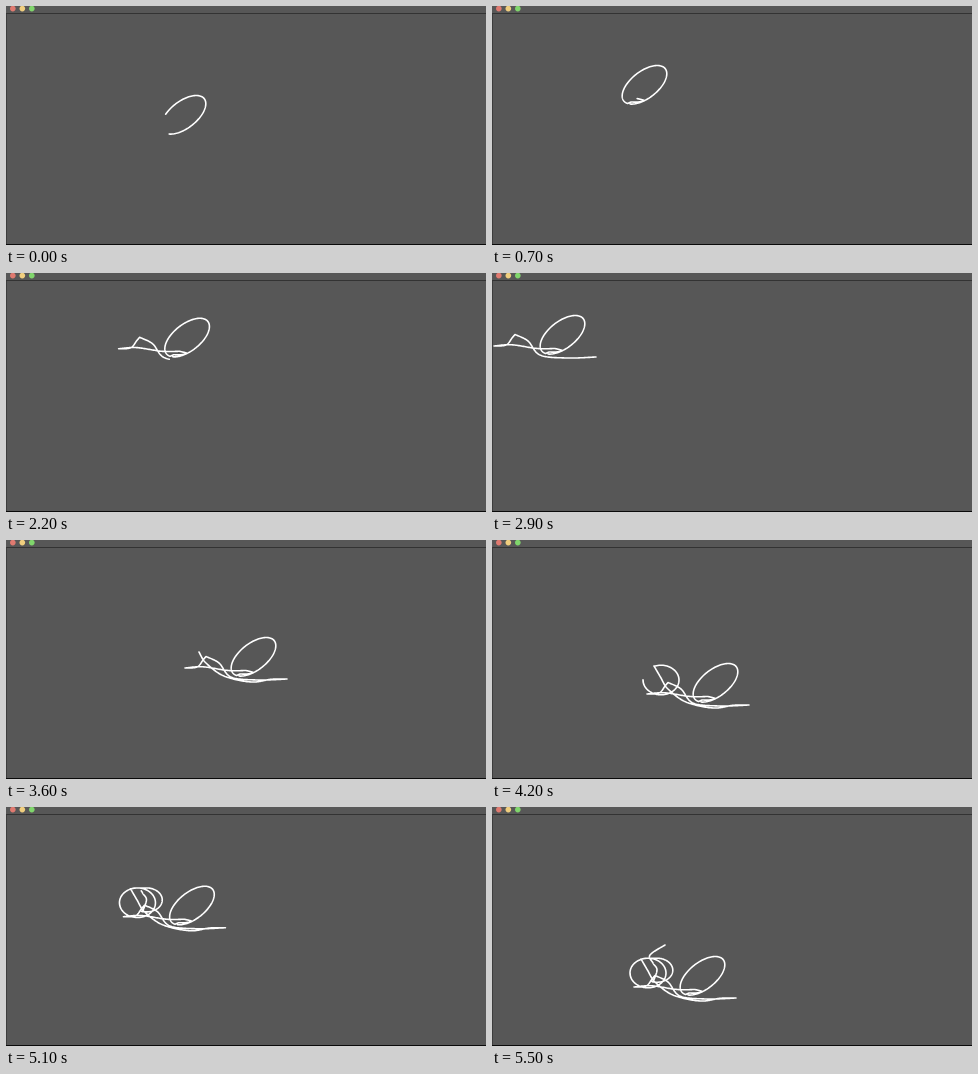
These frames come from a looping animation (480x239 px, 5.6 s). An HTML page with a canvas:

```html
<!DOCTYPE html>
<html>
<head>
<meta charset="utf-8">
<style>
html, body { margin: 0; width: 100%; height: 100%; overflow: hidden; background: #575757; }
canvas { display: block; width: 480px; height: 239px; }
</style>
</head>
<body>
<canvas id="stage" width="480" height="239"></canvas>
<script>
const ctx = document.getElementById('stage').getContext('2d');
const LOOP = 5600, STEP = 100;
const HOLDS = [600, 2400]; // steps that repeat the picture before them

// Catmull-Rom curve through the points; u runs from 0 to points.length - 1.
function spline(points, u) {
  const last = points.length - 1;
  const i = Math.min(Math.floor(u), last - 1), k = u - i;
  const at = n => points[Math.max(0, Math.min(last, n))];
  const [a, b, c, d] = [at(i - 1), at(i), at(i + 1), at(i + 2)];
  return b.map((v, n) => v + k / 2 * (c[n] - a[n]
    + k * (2 * a[n] - 5 * v + 4 * c[n] - d[n] + k * (3 * (v - c[n]) + d[n] - a[n]))));
}

const sample = (count, fn) => Array.from({ length: count + 1 }, (_, i) => fn(i / count));

const curve = (...points) =>
  sample(24 * (points.length - 1), k => spline(points, k * (points.length - 1)));

const oval = (cx, cy, rx, ry, from, to, skew = 0) => sample(90, k => {
  const a = from + (to - from) * k;
  return [cx + rx * Math.cos(a), cy + ry * Math.sin(a + skew)];
});

// The pen line: every point gets the time at which the pen reaches it.
const path = [];
function draw(start, end, ...strokes) {
  const points = strokes.flat();
  let prev = path.length ? path[path.length - 1] : points[0];
  let total = 0;
  const lengths = points.map(p => {
    total += Math.hypot(p[0] - prev[0], p[1] - prev[1]);
    prev = p;
    return total;
  });
  points.forEach(([x, y], i) => path.push([x, y, start + (end - start) * lengths[i] / total]));
}

const bigOval = (from, to) => oval(247.5, 116.8, 22.3, 19.3, from, to, -2.53);
draw(0, 0, bigOval(-2.27, 2.5));
draw(0, 700, bigOval(2.5, 3.85), curve([234, 134], [241, 134], [247, 132.5], [240, 130.5]));
draw(700, 1600, curve([240, 130.5], [222, 130.5], [197, 126.8], [179, 128]),
  curve([179, 128], [191, 127], [197, 120]));
draw(1600, 2900, curve([197, 120], [200, 116.5]),
  curve([200, 116.5], [213, 123], [225, 137], [252, 140], [281, 139]));
draw(2900, 3600, curve([281, 139], [265, 139.3], [245, 142], [218, 136], [200, 123], [193, 112]));
draw(3600, 4700, curve([193, 112], [186, 100]),
  oval(193, 114, 18, 14.8, -1.97, Math.PI * 1.5),
  oval(202, 111.2, 15.8, 12, -Math.PI / 2, 1.9));
draw(4700, 5500, curve([198, 123], [202, 111], [198, 104], [195, 96], [210, 86]));

// Sway of the whole drawing: time, x, y.
const sway = [
  [0, -70, -8], [300, -66, 21], [700, -95, -38], [1000, -25, 15], [1300, 25, -14],
  [1600, -10, -17], [2300, -78, -56], [2900, -177, -55], [3600, 0, 0], [3850, 34, -30],
  [4200, -24, 26], [4500, -50, -12], [4700, -8, -5], [5000, -70, -30], [5400, -10, 38],
  [5500, -37, 52]
];

function swayAt(t) {
  const i = Math.max(1, sway.findIndex(key => key[0] >= t));
  const from = sway[i - 1][0];
  return spline(sway, i - 1 + (t - from) / (sway[i][0] - from)).slice(1);
}

function drawLine(t) {
  ctx.save();
  ctx.translate(...swayAt(t));
  ctx.strokeStyle = '#fff';
  ctx.lineWidth = 1.6;
  ctx.lineCap = ctx.lineJoin = 'round';
  ctx.beginPath();
  for (const [x, y, due] of path) {
    if (due > t) break;
    ctx.lineTo(x, y);
  }
  ctx.stroke();
  ctx.restore();
}

function drawWindow() {
  const box = (color, x, y, w, h) => {
    ctx.fillStyle = color;
    ctx.fillRect(x, y, w, h);
  };
  box('#575757', 0, 0, 480, 239);
  box('#333', 0, 7, 480, 1);
  box('#3c3c3c', 0, 8, 1, 230);
  box('#0a0a0a', 0, 238, 480, 1);
  ['#e07a70', '#f0ce7e', '#80d66c'].forEach((color, i) => {
    ctx.fillStyle = color;
    ctx.beginPath();
    ctx.arc(6.8 + i * 9.5, 2.6, 2.8, 0, Math.PI * 2);
    ctx.fill();
  });
}

const origin = performance.now();
function tick() {
  let t = Math.floor((performance.now() - origin) % LOOP / STEP) * STEP;
  if (HOLDS.includes(t)) t -= STEP;
  drawWindow();
  drawLine(t);
  requestAnimationFrame(tick);
}
tick();
</script>
</body>
</html>
```
